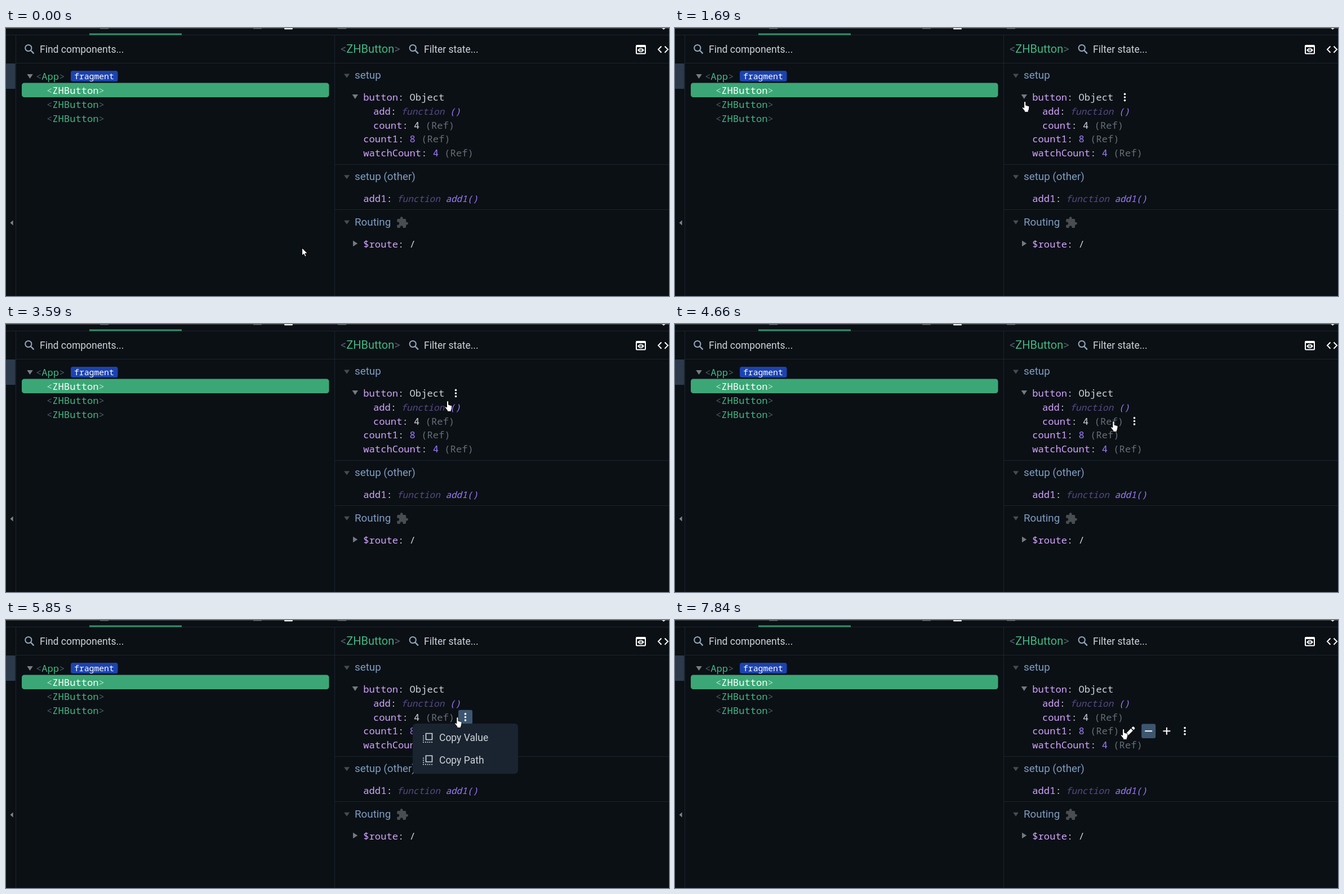
Recreate the animation shown at these times as an HTML page. Size 1177 by 476 pixels, loop 7990 ms.

```html
<!DOCTYPE html>
<html lang="en">
<head>
<meta charset="utf-8">
<title>Component inspector</title>
<style>
html, body { margin: 0; width: 100%; height: 100%; overflow: hidden; background: #0b1015; }
svg { display: block; width: 100%; height: 100%; }
text { white-space: pre; font-family: Roboto, sans-serif; font-size: 17.5px; fill: #ccd3da; }
.mono { font-family: "Roboto Mono", "Noto Sans Mono", monospace; font-size: 17.15px; }
.badge { font-size: 14.75px; }
.tag { font-size: 20px; }
.title { font-size: 18.8px; fill: #7d9dc2; }
.key { fill: #d3a4ff; font-weight: 500; }
.num { fill: #9d7bfb; }
.dim { fill: #666d75; }
.fn, .name { font-style: italic; font-size: 16px; }
.fn { fill: #574b87; }
.name { fill: #9d7bfb; font-weight: 500; }
.green { fill: #42b883; }
.angle { fill: #4e5a66; }
.white { fill: #fff; }
.pale { fill: #b5dfcb; }
.line { stroke: #1b242d; fill: none; }
</style>
</head>
<body>
<svg id="stage" viewBox="0 0 1177 476" xmlns="http://www.w3.org/2000/svg"></svg>
<script>
const LOOP = 7990;
const ROW_H = 24.75;
const LAG = 120;

// cursor moves: start, end, target x, target y
const HOME = [525.5, 390.5];
const MOVES = [
  [0, 700, 433, 440], [700, 1160, 672, 224], [1160, 1570, 616, 130],
  [2780, 3180, 781, 130], [3530, 3710, 773, 153], [3860, 4250, 760, 172],
  [4530, 4900, 806, 172], [5720, 6420, 700, 172], [6710, 6960, 704, 187],
  [7110, 7600, 844, 191], [7700, 7840, 791, 193]
];
// right end of the text in each row that reacts to the cursor
const ROW_ENDS = [778, 807, 795, 788, 829];

const ramp = (t, a, b) => Math.min(1, Math.max(0, (t - a) / (b - a)));
const smooth = p => p * p * (3 - 2 * p);

function cursorAt(t) {
  let [x, y] = HOME;
  for (const [a, b, toX, toY] of MOVES) {
    const p = smooth(ramp(t, a, b));
    x += (toX - x) * p;
    y += (toY - y) * p;
  }
  return [x, y];
}

function rowAt(x, y) {
  const n = Math.floor((y - 113) / 24.6);
  return x > 600 && n >= 0 && n < ROW_ENDS.length ? n : -1;
}

const path = (d, fill, extra = "") => `<path d="${d}" fill="${fill}" ${extra}/>`;
const rect = (x, y, w, h, fill, r = 0) =>
  `<rect x="${x}" y="${y}" width="${w}" height="${h}" rx="${r}" fill="${fill}"/>`;
const stroke = (d, color, w) => path(d, "none", `stroke="${color}" stroke-width="${w}"`);
const line = d => `<path class="line" d="${d}"/>`;
const text = (x, y, s, cls = "") => `<text x="${x}" y="${y}" class="${cls}">${s}</text>`;
const span = (s, cls, dx = 0) => `<tspan class="${cls}" dx="${dx}">${s}</tspan>`;
const tag = (name, a = "angle", b = "green") => span("&lt;", a) + span(name, b) + span("&gt;", a);
const row = (x, y, key, value) => text(x, y, span(key, "key") + ": " + value, "mono");
const ref = (n, cls) => span(n, cls) + span(" (Ref)", "dim");
const func = name => span("function ", "fn", -2) + span(name, "name");
const down = (x, y, fill, w = 5, h = 7) => path(`M${x - w} ${y}h${2 * w}l${-w} ${h}z`, fill);
const section = (y, name) => down(605, y - 8.8, "#464c52") + text(619, y, name, "title");
const search = x =>
  `<circle cx="${x}" cy="35.5" r="5.6" fill="none" stroke="#93a7bb" stroke-width="2"/>` +
  stroke(`M${x + 4} 39.5l5.6 5.8`, "#93a7bb", 2.4);

const PUZZLE = "M20.5 11H19V7c0-1.1-.9-2-2-2h-4V3.5a2.5 2.5 0 0 0-5 0V5H4a2 2 0 0 0-2 2v3.8h1.5a2.7 2.7 0 0 1 0 5.4H2V20a2 2 0 0 0 2 2h3.8v-1.5a2.7 2.7 0 0 1 5.4 0V22H17a2 2 0 0 0 2-2v-4h1.5a2.5 2.5 0 0 0 0-5z";
const HAND = "M3.6 2a1.6 1.6 0 0 1 3.2 0v5.2l4.6 1.3c1.1.3 1.7 1.1 1.5 2.3l-.6 4.2-1.1 2.3V19.4H4.6v-2L.8 12.7c-.8-1.3.4-2.5 1.6-1.7l1.2 1z";
const POINTER = "M0 0V13.6L3.2 10.8l2.2 4.9 2.3-1L5.5 10h4.3z";

function frame() {
  return line("M0 12.5H1177M17.5 13V476M583.5 13V476M18 62.5H1177") +
    rect(0, 0, 1177, 1, "#45494d") + rect(148, 9.5, 164, 3, "#2f8f68") +
    [167, 439, 589].map(x => rect(x, 0, 15, 1.5, "#70757a")).join("") +
    rect(494, 0, 15, 2.5, "#e4e6e8", 1) + path("M1164 0h7l-3.5 3z", "#d5d8dc") +
    rect(0, 63, 16.5, 45, "#2c3a4c") + path("M12.5 341.5v9l-5-4.5z", "#80868c") +
    search(39.8) + text(60, 44, "Find components...") +
    text(594, 44, tag("ZHButton"), "tag") +
    search(722.2) + text(742, 44, "Filter state...") +
    rect(1118, 30, 18, 16.5, "#fff", 2) + rect(1120, 34, 14, 10.5, "#0b1015") +
    path("M1121 39.2q6-7.6 12 0q-6 7.6-12 0z", "#fff") +
    `<circle cx="1127" cy="39.2" r="1.7" fill="#fff" stroke="#0b1015" stroke-width="1.1"/>` +
    stroke("M1163.5 32.5l-5.5 5.6 5.5 5.6M1169.5 32.5l5.5 5.6-5.5 5.6", "#fff", 2);
}

function tree() {
  return down(42.5, 82, "#777d83", 5.2, 8) + text(53, 92, tag("App"), "mono") +
    rect(115, 76, 83.5, 19, "#1c43b0", 3.5) +
    text(121, 91.3, "fragment", "mono white badge") +
    rect(28, 97.5, 545.5, 25.5, "#3ba776", 4.5) +
    text(72, 117, tag("ZHButton", "pale", "white"), "mono") +
    [142, 167].map(y => text(72, y, tag("ZHButton"), "mono")).join("");
}

function state() {
  const y = n => 129 + n * ROW_H;
  return section(90.4, "setup") +
    `<g id="arrow">${path("M-5.2 -4h10.4l-5.2 8z", "#747a80")}</g>` +
    row(634.3, y(0), "button", "Object") +
    `<g id="kids">` +
      row(652, y(1), "add", func("()")) +
      row(652, y(2), "count", ref("4", "")) +
    `</g><g id="tail">` +
      row(634.3, y(3), "count1", ref("8", "num")) +
      row(634.3, y(4), "watchCount", ref("4", "num")) +
      line("M584 242.5H1177M584 322.5H1177") +
      section(270, "setup (other)") +
      row(634.3, 308.8, "add1", func("add1()")) +
      section(350.6, "Routing") +
      path(PUZZLE, "#484d52", `transform="translate(692.3 334.4) scale(.94)"`) +
      path("M616 377.5v10.5l8.2-5.2z", "#747a80") +
      row(634.3, 389.5, "$route", "/") +
    `</g>`;
}

function menu() {
  const item = (y, label) => {
    let s = stroke(`M745.5 ${y - 7.5}h11v11h-11z`, "#ccd3da", 1.7);
    for (let i = 0; i < 4; i++)
      s += rect(740.2, y - 4 + i * 3.7, 1.8, 1.8, "#ccd3da") +
           rect(744 + i * 3.7, y + 7.1, 1.8, 1.8, "#ccd3da");
    return s + text(769, y + 6, label);
  };
  return `<g id="menu">${rect(722, 184, 187, 89, "#1a2430", 6)}` +
    item(209, "Copy Value") + item(248.5, "Copy Path") + `</g>`;
}

const ICONS = {
  more: [-5.6, 0, 5.6].map(y => `<circle cy="${y}" r="1.8" fill="#fff"/>`).join(""),
  minus: stroke("M-6.5 0h13", "#fff", 2),
  plus: stroke("M-6.5 0h13M0 -6.5v13", "#fff", 2),
  edit: path("M-8 8v-3.6l8.8-8.8 3.6 3.6L-4.4 8zM2-5.6l1.9-1.9q1-.8 2 0l1.6 1.6q.8 1 0 2L5.6-2z", "#fff")
};

// icons after the hovered row; the one under the finger gets a box
function tools(n, finger) {
  if (n < 0) return "";
  const names = n > 2 ? ["edit", "minus", "plus", "more"] : ["more"];
  return names.map((name, i) => {
    const x = ROW_ENDS[n] + 20.5 + i * 32.2;
    const box = Math.abs(finger - x) < 12 ? rect(-12.5, -12.7, 25, 25.5, "#3d5670", 3) : "";
    return `<g transform="translate(${x} ${123 + n * ROW_H})">${box}${ICONS[name]}</g>`;
  }).join("");
}

const stage = document.getElementById("stage");
stage.innerHTML = frame() + tree() + state() + `<g id="tools"></g>` + menu() +
  path("", "#fff", `id="cursor" stroke="#000" stroke-width="1" stroke-linejoin="round"`);
const [arrow, kids, tail, toolbar, popup, cursor] =
  ["arrow", "kids", "tail", "tools", "menu", "cursor"].map(id => document.getElementById(id));

function draw(t) {
  const [x, y] = cursorAt(t);
  const hover = rowAt(x, y);
  const folded = t >= 1840 && t < 2390;
  const turn = ramp(t, 1780, 1960) - ramp(t, 2300, 2510);
  arrow.setAttribute("transform", `translate(619.8 122) rotate(${-90 * turn})`);
  kids.setAttribute("visibility", folded ? "hidden" : "visible");
  tail.setAttribute("transform", `translate(0 ${folded ? -2 * ROW_H : 0})`);
  toolbar.innerHTML = tools(hover, cursorAt(t - LAG)[0] + 5);
  popup.setAttribute("opacity", ramp(t, 5210, 5420) - ramp(t, 6150, 6400));
  cursor.setAttribute("d", hover < 0 ? POINTER : HAND);
  cursor.setAttribute("transform", `translate(${x} ${y})`);
}

const start = performance.now();
function tick() {
  draw((performance.now() - start) % LOOP);
  requestAnimationFrame(tick);
}
tick();
</script>
</body>
</html>
```
